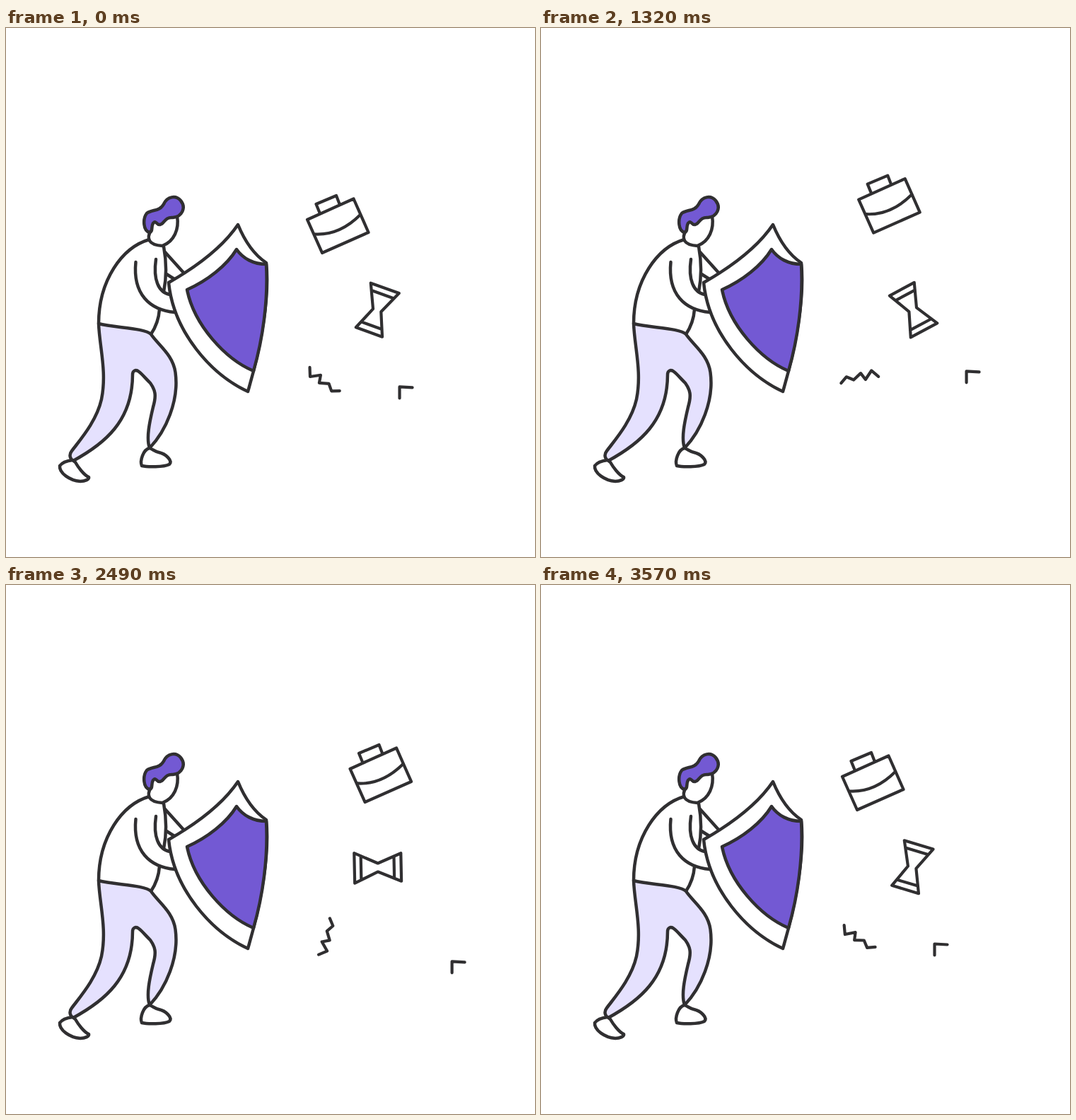
These frames come from a looping animation (748x748 px, 3600 ms). An HTML page:

```html
<!DOCTYPE html>
<html lang="en">
<head>
<meta charset="utf-8">
<title>Shield</title>
<style>
html, body { margin: 0; width: 100%; height: 100%; overflow: hidden; background: #fff; }
svg { display: block; width: 100vw; height: 100vh; }
.ink { fill: none; stroke: #302f31; stroke-width: 4.5; stroke-linecap: round; stroke-linejoin: round; }
.thin { stroke-width: 4.2; }
.white { fill: #fff; }
.violet { fill: #7359d3; }
.lilac { fill: #e5e1fe; }
</style>
</head>
<body>
<svg viewBox="0 0 748 748">
  <g class="ink">
    <!-- torso and arms -->
    <path d="M203 299C164 310 131 357 131 418"/>
    <path d="M223 309C228 336 226 358 223 373M217 398C216 412 211 424 205 433"/>
    <path d="M225 317L252 347M227 348L238 355"/>
    <path d="M183.500 331C179 376 203 399 239 402"/>
    <path d="M212 327C208 355 215 374 232 377"/>
    <!-- legs -->
    <path class="lilac" d="M131 418C154 424 196 424 205 433C216 449 236 462 239.500 487C245 527 226 570 203 594C198 580 203 557 208 536C213 519 211 512 204 502C197 495 192 489 188 486C183 482 179 485 179 490C179 556 139 588 95 612C90 609 89 603 93 598C105 582 128 556 135 525C143 486 132 450 131 418Z"/>
    <!-- shoes -->
    <path class="white" d="M94 611C86 612 79 615 76 619C75 629 90 640 105 641C112 641 118 638 117 635C110 632 102 621 98 614Z"/>
    <path class="white" d="M203 594C194 596 189 612 192 619C200 621 223 621 231 617C236 612 226 602 216 600C211 599 208 596 203 594Z"/>
    <!-- head -->
    <path class="white" d="M205 286C198 298 202 307 221 308C238 302 245 284 242 266"/>
    <path class="violet" d="M203 289C194 287 193 270 199 262C207 256 217 260 223 249C228 238 240 236 247 244C255 254 249 267 236 268C224 267 224 277 218 278C212 279 213 271 208 276C205 281 208 288 203 289Z"/>
    <!-- shield -->
    <path class="white" d="M328 278C337 300 350 320 368 332C373 380 361 450 342 514C290 490 237 430 230 360C265 340 305 312 328 278Z"/>
    <path class="violet" d="M326 313C335 326 350 334 368 334C371 385 363 440 350 485C310 468 266 420 256 370C285 357 312 336 326 313Z"/>
  </g>
  <g class="ink thin">
    <g id="case">
      <path d="M426 271L491.500 241.500L512.500 289L447 318ZM444 262.500L438.500 249L467 237L472 250"/>
      <path d="M436 291.500C460 293 482 283 501 264"/>
    </g>
    <path id="glass" d="M32.700 -22L32.700 20.500L-.5 5.400L-33.300 19L-33.300 -20.500L-.5 -6.600ZM23.400 -17.500V16.300M-23.400 -16.300V14.900"/>
    <path id="zigzag" d="M-21 -17L-20.500 -4L-5.600 -6.200L-7.600 4.800L6 5.800L9.800 16.400L21.300 16"/>
    <path id="corner" d="M556.500 523.500V507.500L574.500 508.500"/>
  </g>
</svg>
<script>
const LOOP = 3600;
const KEYS = [0, 1200, 2420, 3570];
const part = id => document.getElementById(id);
const [bag, glass, zigzag, corner] = ["case", "glass", "zigzag", "corner"].map(part);

// Point on a cubic curve
function cubic(a, b, c, d, s) {
  const r = 1 - s;
  return [0, 1].map(i =>
    r * r * r * a[i] + 3 * r * r * s * b[i] + 3 * r * s * s * c[i] + s * s * s * d[i]);
}

// Each path has three legs: up, out and back home
function bagAt(leg, s) {
  if (leg === 0) return [16 * s + 3 * s * s, -28.2 * s];
  if (leg === 1) return [19 + 42 * s + 3.5 * s * s, -28.2 - 4 * s + 20.2 * s * s];
  const r = 1 - s;
  return [64.5 * r, -10 * r - 2 * r * r * r];
}

function cornerAt(leg, s) {
  const home = [0, 0], top = [40.2, -25.5], far = [79, 26.5];
  if (leg === 0) return cubic(home, [8, -20], [21, -28.6], top, s);
  if (leg === 1) return cubic(top, [55, -16], [88, 10.8], far, s);
  return far.map(v => v * (1 - s));
}

const move = (el, p) => el.setAttribute("transform", `translate(${p[0]} ${p[1]})`);
const spin = (el, x, y, deg) => el.setAttribute("transform", `translate(${x} ${y}) rotate(${deg})`);

function draw(t) {
  const leg = t < KEYS[1] ? 0 : t < KEYS[2] ? 1 : 2;
  const s = Math.min(1, (t - KEYS[leg]) / (KEYS[leg + 1] - KEYS[leg]));
  const turn = t / LOOP * 360;
  move(bag, bagAt(leg, s));
  move(corner, cornerAt(leg, s));
  spin(glass, 525.4, 398.9, turn - 70.3);
  spin(zigzag, 450.5, 497, turn);
}

const start = performance.now();
function tick() {
  draw((performance.now() - start) % LOOP);
  requestAnimationFrame(tick);
}
tick();
</script>
</body>
</html>
```
